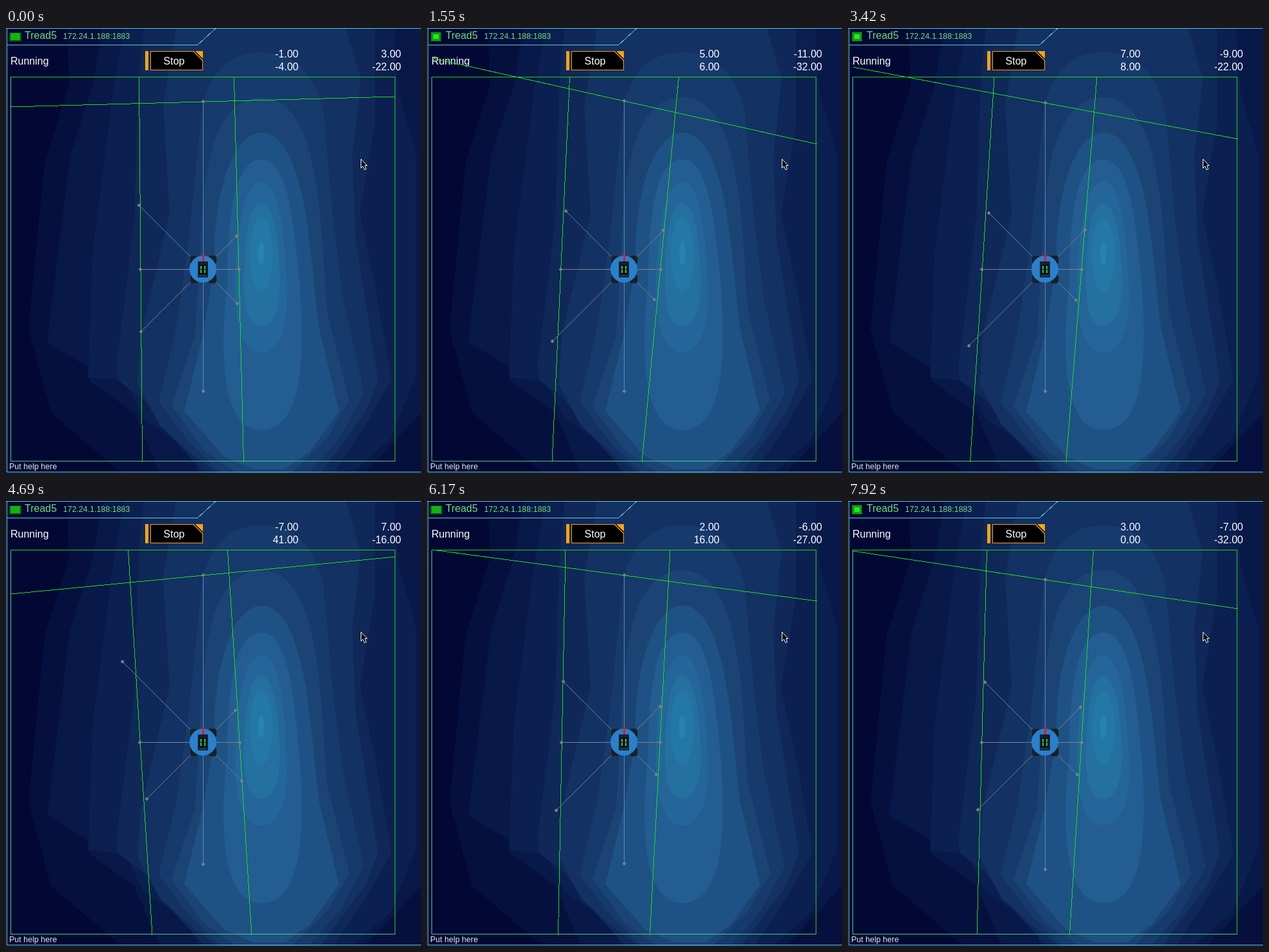
An HTML page for the animation above (8 s loop, 647 by 694 pixels).

```html
<!DOCTYPE html>
<html lang="en">
<head>
<meta charset="utf-8">
<title>Rover console</title>
<style>
  html, body { margin: 0; width: 100%; height: 100%; overflow: hidden; background: #020733; }
  svg { display: block; width: 647px; height: 694px; font-family: "Liberation Sans", Arial, sans-serif; }
  .label { font-size: 16px; fill: #fff; }
  .small { font-size: 12.5px; }
  .crisp { shape-rendering: crispEdges; fill: none; stroke-width: 1; }
  .end { text-anchor: end; }
</style>
</head>
<body>
<svg viewBox="0 0 647 694">
  <rect width="647" height="694" fill="#020733"/>
  <g id="relief">
    <path fill="#05103e" d="M95 0 98 90 60 210 35 470 70 600 180 694H647V0Z"/>
    <path fill="#081848" d="M150 0 135 90 100 200 64 490 130 530 130 550 200 600 240 694H560L647 600V0Z"/>
    <path fill="#0b2050" d="M185 0 168 90 135 350 128 545 185 550 215 610 290 660 300 694H540L600 640 640 540V200L612 100 605 0Z"/>
    <path fill="#0f2858" d="M215 0 207 77 200 300 172 530 175 550 215 580 260 640 310 694H510L560 620 601 548 575 400 552 290 575 150 575 0Z"/>
    <path fill="#133163" d="M265 0 245 120 255 290 210 480 205 555 240 620 290 665 330 694H490L530 640 560 600 580 550 545 330 540 200 553 80 530 0Z"/>
    <path fill="#173a6c" d="M398 38C340 38 315 80 305 130L285 330 265 470 238 583 285 645 335 694H472L520 640 558 570 525 420 510 300 495 130C480 70 450 38 398 38Z"/>
    <path fill="#1b4475" d="M398 108C330 110 312 200 305 300L295 480 258 590 310 660 360 694H445L500 640 535 580 500 440C490 300 490 110 398 108Z"/>
    <path fill="#1f5284" d="M398 163C350 165 322 270 325 370L307 478 278 598 340 668 385 688H435L474 660 519 598 488 468C475 380 472 165 398 163Z"/>
    <path fill="#235d91" d="M398 205C355 205 345 300 345 400C335 480 330 627 398 627C466 627 465 500 458 400C448 300 440 205 398 205Z"/>
    <path fill="#24669a" d="M398 240C365 240 357 350 357 410C357 470 372 506 398 506C424 506 440 470 438 410C436 350 430 240 398 240Z"/>
    <path fill="#24709f" d="M398 273C375 273 371 350 371 400C371 440 380 465 398 465C416 465 427 440 427 400C427 350 420 273 398 273Z"/>
    <ellipse cx="398" cy="354" rx="18" ry="58" fill="#2478a6"/>
    <ellipse cx="398" cy="352" rx="5" ry="18" fill="#2584b0"/>
  </g>

  <path class="crisp" stroke="#5cc8dc" d="M0 .5H647M1.5 0V692.5H647M1 26.5H298.5L327 .5"/>
  <g id="lampDim">
    <rect x="5" y="7" width="19" height="14" fill="#075407"/>
    <rect x="7" y="8" width="15" height="11" fill="#12b512"/>
  </g>
  <g id="lampLit">
    <rect x="6" y="6" width="16" height="15" fill="#0a5a0a"/>
    <rect x="7" y="7" width="14" height="13" fill="#10a010"/>
    <rect x="10" y="10" width="8" height="7" fill="#20f020"/>
  </g>
  <text x="29" y="17" font-size="16" fill="#70dc78">Tread5</text>
  <text x="89" y="17" class="small" fill="#70dc78">172.24.1.188:1883</text>

  <text x="7" y="57" class="label">Running</text>
  <rect x="217" y="36" width="5" height="30" fill="#f9a312"/>
  <rect class="crisp" x="225.5" y="36.5" width="81" height="29" style="fill:#000" stroke="#f9a312"/>
  <path fill="#f9a312" d="M291 36H307V52Z"/>
  <path stroke="#000" stroke-width="1.5" d="M294 36 307 49"/>
  <text x="262" y="57" class="label" text-anchor="middle">Stop</text>
  <g id="readings" class="label end">
    <text x="456" y="46"/><text x="456" y="66"/><text x="616" y="46"/><text x="616" y="66"/>
  </g>

  <path class="crisp" stroke="#48cf84" d="M7.5 76V675.5H607"/>
  <path class="crisp" stroke="#1cd41c" d="M7 76.5H606.5V676"/>
  <path id="walls" class="crisp" stroke="#18e018"/>
  <g id="rays" class="crisp"></g>
  <path id="dots" fill="#808080"/>

  <g id="robot">
    <g fill="#16202c" stroke="#33414e">
      <rect x="286.500" y="354.500" width="14" height="15" rx="5"/>
      <rect x="314.500" y="354.500" width="14" height="15" rx="5"/>
      <rect x="286.500" y="383.500" width="14" height="15" rx="5"/>
      <rect x="314.500" y="383.500" width="14" height="15" rx="5"/>
    </g>
    <circle cx="307" cy="376" r="21" fill="#2a80cc"/>
    <rect x="299" y="364" width="16" height="25" rx="1" fill="#14212d"/>
    <rect x="301" y="369" width="12" height="15" fill="#08150f"/>
    <path stroke="#28c878" stroke-width="2" stroke-dasharray="5 1" d="M304 371V382M310 371V382"/>
    <path stroke="#3a5068" d="M301 386.500H313"/>
    <path stroke="#e01830" stroke-width="3" d="M307.500 352V364"/>
  </g>

  <text x="5" y="688" class="small" fill="#e4e8f0">Put help here</text>
  <path fill="#000" stroke="#fff" d="M553.500 204.500V218.500L556.500 215.500 559 221 561.500 220 559.500 214.500H563Z"/>
</svg>
<script>
const LOOP = 8000;
const CENTER = { x: 307, y: 376 };
const $ = id => document.getElementById(id);

// Moments at which the display refreshes: [first, last, count].
const refreshes = [
  [0, 0, 1], [180, 700, 5], [1000, 1550, 5], [1820, 2030, 2], [2320, 2640, 3],
  [2820, 3150, 3], [3420, 3420, 1], [3600, 4420, 7], [4510, 4690, 2], [4780, 5490, 6],
  [5750, 6170, 4], [6380, 6560, 2], [6850, 7380, 5], [7650, 7650, 1], [7920, 7920, 1]
].flatMap(([first, last, count]) =>
  Array.from({ length: count }, (_, i) => first + (last - first) * i / Math.max(1, count - 1)));

const lampToggles = [570, 1900, 2400, 3700, 5070, 5800, 6980];

// wall: front y at both sides, left x and right x at top and bottom.
// diag: sensor reach towards front left, front right, back left, back right.
const poses = [
  { at: 0,    wall: [123, 107, 207.5, 212.5, 355.5, 370.5], diag: [100, 52, 97, 53], back: 566, read: [-1, -4, 3, -22] },
  { at: 1550, wall: [47, 181, 222.5, 195, 392.5, 335], diag: [91, 61, 112, 47], back: 566, read: [5, 6, -11, -32] },
  { at: 2640, wall: [36, 227, 239, 172, 410, 320.5], diag: [83, 78, 141, 43], back: 556, read: [13, 10, -17, -21] },
  { at: 3420, wall: [61, 173, 228, 190.5, 388, 340], diag: [88, 62, 119, 48], back: 566, read: [7, 8, -9, -22] },
  { at: 4690, wall: [145, 87, 190.5, 228, 345.5, 383], diag: [126, 50, 88, 60], back: 566, read: [-7, 41, 7, -16] },
  { at: 6170, wall: [76, 156, 216, 204.5, 379, 347.5], diag: [95, 56, 106, 50], back: 565, read: [2, 16, -6, -27] },
  { at: 7920, wall: [78, 168, 216.5, 201, 382.5, 345.5], diag: [94, 55, 105, 50], back: 574, read: [3, 0, -7, -32] }
];

const rayColors = ['#5d86b4', '#5d86b4', '#7f8488', '#7f8488', '#5f86a8', '#80807c', '#7f8080', '#5f86a8'];
const rays = rayColors.map(color => {
  const line = document.createElementNS('http://www.w3.org/2000/svg', 'path');
  line.setAttribute('stroke', color);
  return $('rays').appendChild(line);
});

const mean = (a, b) => (a + b) / 2;

function poseAt(time) {
  const next = poses.findIndex(pose => pose.at > time);
  if (next < 0) return poses[poses.length - 1];
  const a = poses[next - 1], b = poses[next];
  const u = (time - a.at) / (b.at - a.at);
  const k = u * u * (3 - 2 * u);
  const mix = (p, q) => p + (q - p) * k;
  const mixAll = key => a[key].map((value, i) => mix(value, b[key][i]));
  return { wall: mixAll('wall'), diag: mixAll('diag'), read: mixAll('read'), back: mix(a.back, b.back) };
}

function render(time) {
  const shown = refreshes.filter(moment => moment <= time).pop();
  const { wall, diag, back, read } = poseAt(shown);
  const [frontA, frontB, leftA, leftB, rightA, rightB] = wall;
  const { x, y } = CENTER;

  $('walls').setAttribute('d',
    `M8 ${frontA}L607.5 ${frontB}M${leftA} 77L${leftB} 677M${rightA} 77L${rightB} 677`);

  const tips = [
    [x, mean(frontA, frontB) - .7], [x, back],
    [mean(leftA, leftB) - 1, y], [mean(rightA, rightB), y],
    [x - diag[0], y - diag[0]], [x + diag[1], y - diag[1]],
    [x - diag[2], y + diag[2]], [x + diag[3], y + diag[3]]
  ].map(tip => tip.map(v => Math.round(v) + .5));

  tips.forEach(([tx, ty], i) => rays[i].setAttribute('d', `M${x + .5} ${y + .5}L${tx} ${ty}`));
  $('dots').setAttribute('d', tips.map(([tx, ty]) => `M${tx - 3} ${ty}l3-3 3 3-3 3z`).join(''));

  [...$('readings').children].forEach((text, i) => {
    text.textContent = (Math.round(read[i]) || 0).toFixed(2);
  });

  const lit = lampToggles.filter(moment => moment <= shown).length % 2 === 1;
  $('lampLit').style.display = lit ? '' : 'none';
  $('lampDim').style.display = lit ? 'none' : '';
}

const start = performance.now();
function tick() {
  render((performance.now() - start) % LOOP);
  requestAnimationFrame(tick);
}
tick();
</script>
</body>
</html>
```
